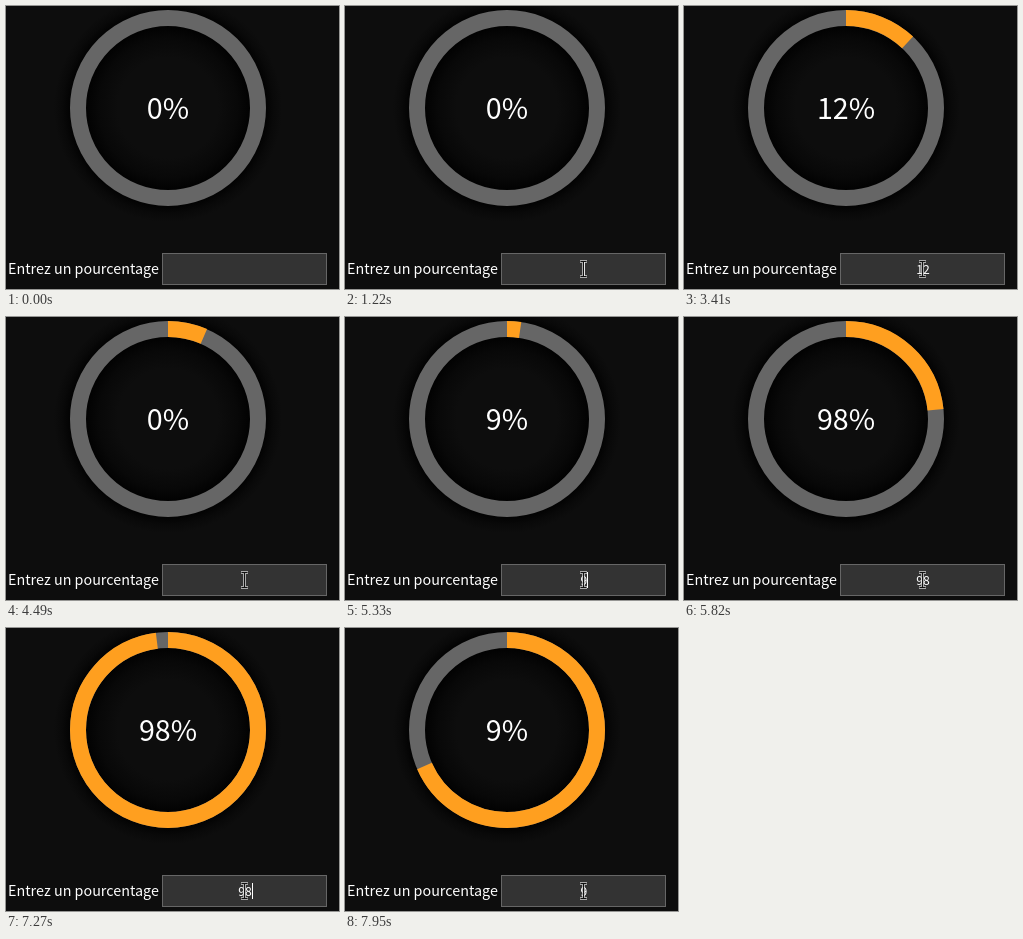
Animation of 333 by 283 pixels, one loop 8000 ms. Source, as an HTML page:

```html
<!DOCTYPE html>
<html lang="fr">
<head>
<meta charset="utf-8">
<title>Pourcentage</title>
<style>
  html, body { margin: 0; width: 100%; height: 100%; overflow: hidden; background: #0d0d0d; }
  svg { display: block; }
  text { font-family: "Noto Sans CJK JP", "Noto Sans CJK SC", "Noto Sans CJK KR", "Noto Sans", sans-serif; fill: #fff; }
</style>
</head>
<body>
<svg width="333" height="283" viewBox="0 0 333 283">
  <defs>
    <radialGradient id="shade" gradientUnits="userSpaceOnUse" cx="162" cy="102" r="120">
      <stop offset=".42" stop-color="#0d0d0d"/>
      <stop offset=".58" stop-color="#080808"/>
      <stop offset=".68" stop-color="#020202"/>
      <stop offset=".82" stop-color="#030303"/>
      <stop offset=".88" stop-color="#090909"/>
      <stop offset=".95" stop-color="#0d0d0d"/>
    </radialGradient>
  </defs>
  <rect width="333" height="283" fill="#0d0d0d"/>
  <circle cx="162" cy="102" r="120" fill="url(#shade)"/>
  <g fill="none" stroke-width="16" transform="rotate(-90 162 102)">
    <circle cx="162" cy="102" r="90" stroke="#666"/>
    <circle id="arc" cx="162" cy="102" r="90" stroke="#ff9f1f" pathLength="360"/>
  </g>
  <text id="label" x="162" y="113" font-size="28.65" text-anchor="middle">0%</text>
  <text x="2" y="268" font-size="14.33">Entrez un pourcentage</text>
  <rect x="156.5" y="247.5" width="164" height="31" fill="#333" stroke="#666"/>
  <text id="field" x="239" y="268" font-size="12.2" text-anchor="middle"></text>
  <rect id="caret" y="255" width="1" height="16" fill="#fff"/>
  <g id="pointer" fill="none">
    <path d="M-3.5-7.5H3.5M-3.5 7.5H3.5M0-7.5V7.5" stroke="#ddd" stroke-width="3" stroke-opacity=".7"/>
    <path d="M-3-7.5H3M-3 7.5H3M0-7.5V7.5" stroke="#111"/>
  </g>
</svg>
<script>
const LOOP = 8000, STEP = 70, LAG = 18, SWEEP = 1000;

// [time, field value]
const edits = [[1680, "1"], [1932, "12"], [3930, "1"], [4170, ""], [5105, "9"], [5603, "98"], [7600, "9"]];
const bursts = [0, 1680, 3930, 7600];
// times at which the caret turns on or off, starting with on
const blinks = [1220, 2350, 2880, 3410, 3940, 4470, 5000, 5680, 6210, 6740, 7270, 7800];
const caretX = [239, 242, 246];
// pointer path, one point every 80 ms from 260 ms on
const path = [[262, 281], [255, 274], [247, 266], [238, 260], [229, 258], [228, 259], [234, 262], [238, 263]];

const el = id => document.getElementById(id);
const arc = el("arc"), label = el("label"), field = el("field"), caret = el("caret"), pointer = el("pointer");

const snap = t => {
  const start = bursts.filter(b => b <= t).pop();
  return start + Math.floor((t - start) / STEP) * STEP;
};

// each edit starts a linear sweep from wherever the arc is
const sweeps = [];
const sweepAt = (s, t) => s.from + (s.to - s.from) * Math.min(1, Math.max(0, (t - s.start) / SWEEP));
function angle(t) {
  const s = sweeps.filter(s => s.start <= t).pop();
  return s ? sweepAt(s, t) : 0;
}
for (const [time, value] of edits) {
  const start = time + LAG;
  sweeps.push({ start, from: angle(start), to: value * 3.6 });
}

function draw(t) {
  const q = snap(t);
  const edit = edits.filter(e => e[0] <= q).pop();
  const value = edit ? edit[1] : "";
  const a = angle(q);
  arc.setAttribute("stroke-dasharray", `${a} 400`);
  arc.style.visibility = a > 0.05 ? "visible" : "hidden";
  label.textContent = (value || "0") + "%";
  field.textContent = value;
  caret.setAttribute("x", caretX[value.length]);
  caret.style.visibility = blinks.filter(b => b <= t).length % 2 ? "visible" : "hidden";

  const i = Math.min(path.length - 1, Math.floor((t - 260) / 80));
  pointer.style.visibility = i < 0 ? "hidden" : "visible";
  if (i >= 0) pointer.setAttribute("transform", `translate(${path[i][0] + 0.5} ${path[i][1]})`);
}

const begin = performance.now();
function tick() {
  draw((performance.now() - begin) % LOOP);
  requestAnimationFrame(tick);
}
tick();
</script>
</body>
</html>
```
